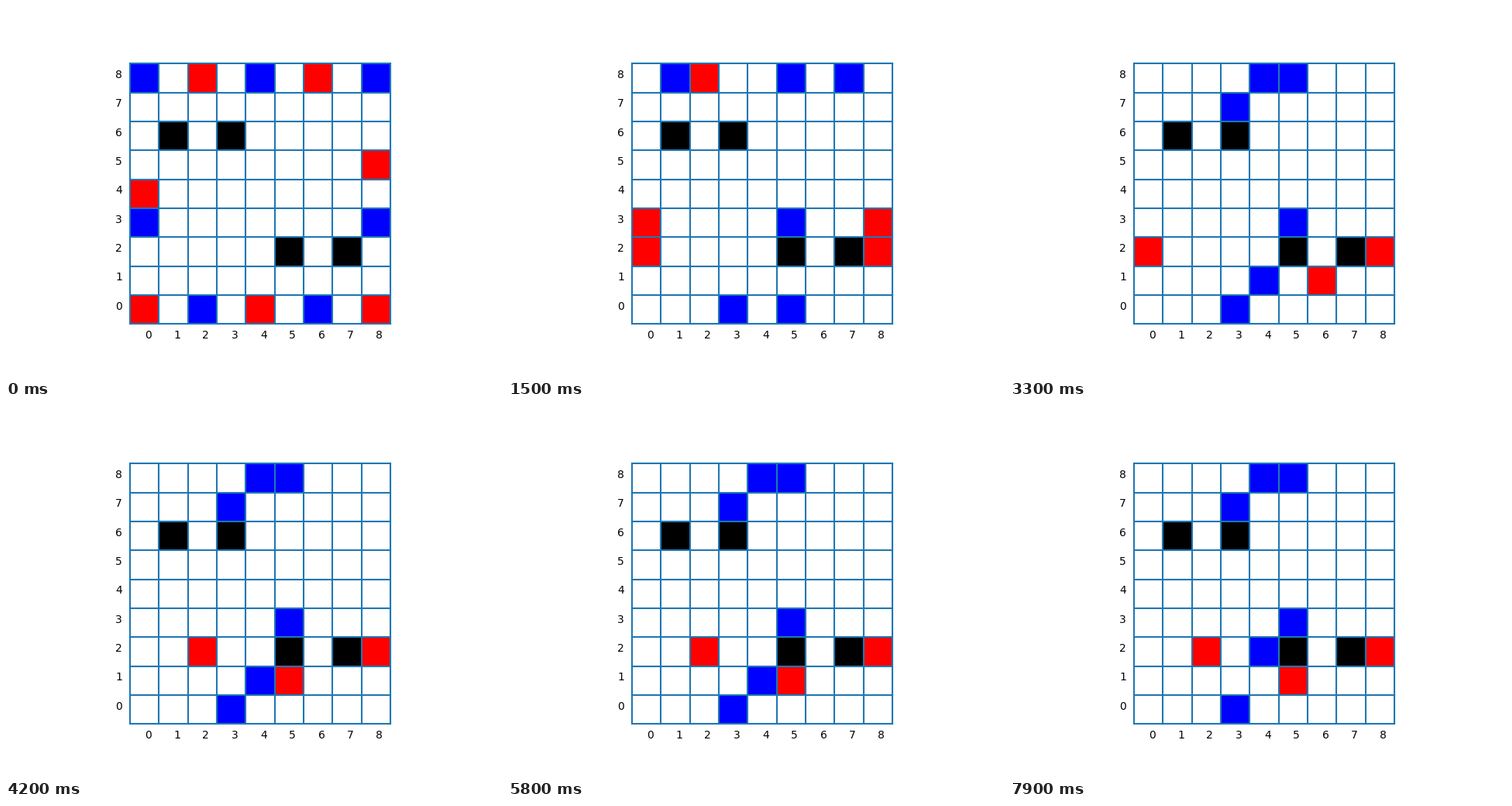
A matplotlib script for the animation above (8000 ms loop, 640 px wide and 480 px high).

```python
import matplotlib.pyplot as plt
from matplotlib.animation import FuncAnimation
from matplotlib.patches import Rectangle

SIZE = 9
FRAMES, INTERVAL = 80, 100
BLOCKS = [(1, 6), (3, 6), (5, 2), (7, 2)]
BLUE = [(0, 8), (4, 8), (8, 8), (0, 3), (8, 3), (2, 0), (6, 0)]
RED = [(2, 8), (6, 8), (8, 5), (0, 4), (0, 0), (4, 0), (8, 0)]
DIRS = {"N": (0, 1), "S": (0, -1), "E": (1, 0), "W": (-1, 0)}

# Column, row and heading; the sides alternate, blue first.
OPENING = """
20E 80N 60W 81N 83W 85S 73W 84S
48E 00N 88W 01N 08E 04S 63W 03S
78W 01E 68W 11E 58S 28E
18E 83S 28E 81W 38S 21S 57N 20E
50W 71W 40N 61W 41N 02E
""".split()
CYCLE = "42S 12E 41N 22W".split()


def flanked(board, cell):
    """True if two opposing neighbours both belong to the other side."""
    x, y = cell
    for dx, dy in ((1, 0), (0, 1)):
        a = board.get((x + dx, y + dy))
        b = board.get((x - dx, y - dy))
        if a is not None and a == b != board[cell]:
            return True
    return False


def play(board, move):
    x, y = int(move[0]), int(move[1])
    dx, dy = DIRS[move[2]]
    board = dict(board)
    side = board.pop((x, y))
    step = 2 if (x + dx, y + dy) in board else 1  # jump over a neighbour
    x, y = x + step * dx, y + step * dy
    board[x, y] = side
    for ax_, ay in DIRS.values():
        cell = (x + ax_, y + ay)
        if board.get(cell, side) != side and flanked(board, cell):
            del board[cell]
    if flanked(board, (x, y)):
        del board[x, y]
    return board


def history():
    board = {c: "blue" for c in BLUE} | {c: "red" for c in RED}
    boards = [board]
    for i in range(FRAMES - 1):
        n = i - len(OPENING)
        board = play(board, OPENING[i] if n < 0 else CYCLE[n % len(CYCLE)])
        boards.append(board)
    return boards


boards = history()

fig, ax = plt.subplots(figsize=(6.4, 4.8), dpi=100)
fig.subplots_adjust(left=0.125, right=0.9, bottom=0.11, top=0.88)
ax.set_xlim(-0.45, SIZE + 0.45)
ax.set_ylim(-0.45, SIZE + 0.45)
ax.set_aspect("equal")
ax.axis("off")

cells = {}
for x in range(SIZE):
    for y in range(SIZE):
        color = "black" if (x, y) in BLOCKS else "white"
        cell = ax.add_patch(Rectangle((x, y), 1, 1, facecolor=color, linewidth=0))
        if (x, y) not in BLOCKS:
            cells[x, y] = cell

for k in range(SIZE + 1):
    ax.plot([k, k], [0, SIZE], color="#1f77b4", lw=1.5)
    ax.plot([0, SIZE], [k, k], color="#1f77b4", lw=1.5)

for k in range(SIZE):
    for pos in ((k + 0.5, -0.5), (-0.5, k + 0.5)):
        ax.text(*pos, str(k), fontsize=10, family="DejaVu Sans")


def update(i):
    for pos, cell in cells.items():
        cell.set_facecolor(boards[i].get(pos, "white"))
    return list(cells.values())


anim = FuncAnimation(fig, update, frames=FRAMES, interval=INTERVAL,
                     repeat=True, repeat_delay=0, blit=False)
plt.show()
```
